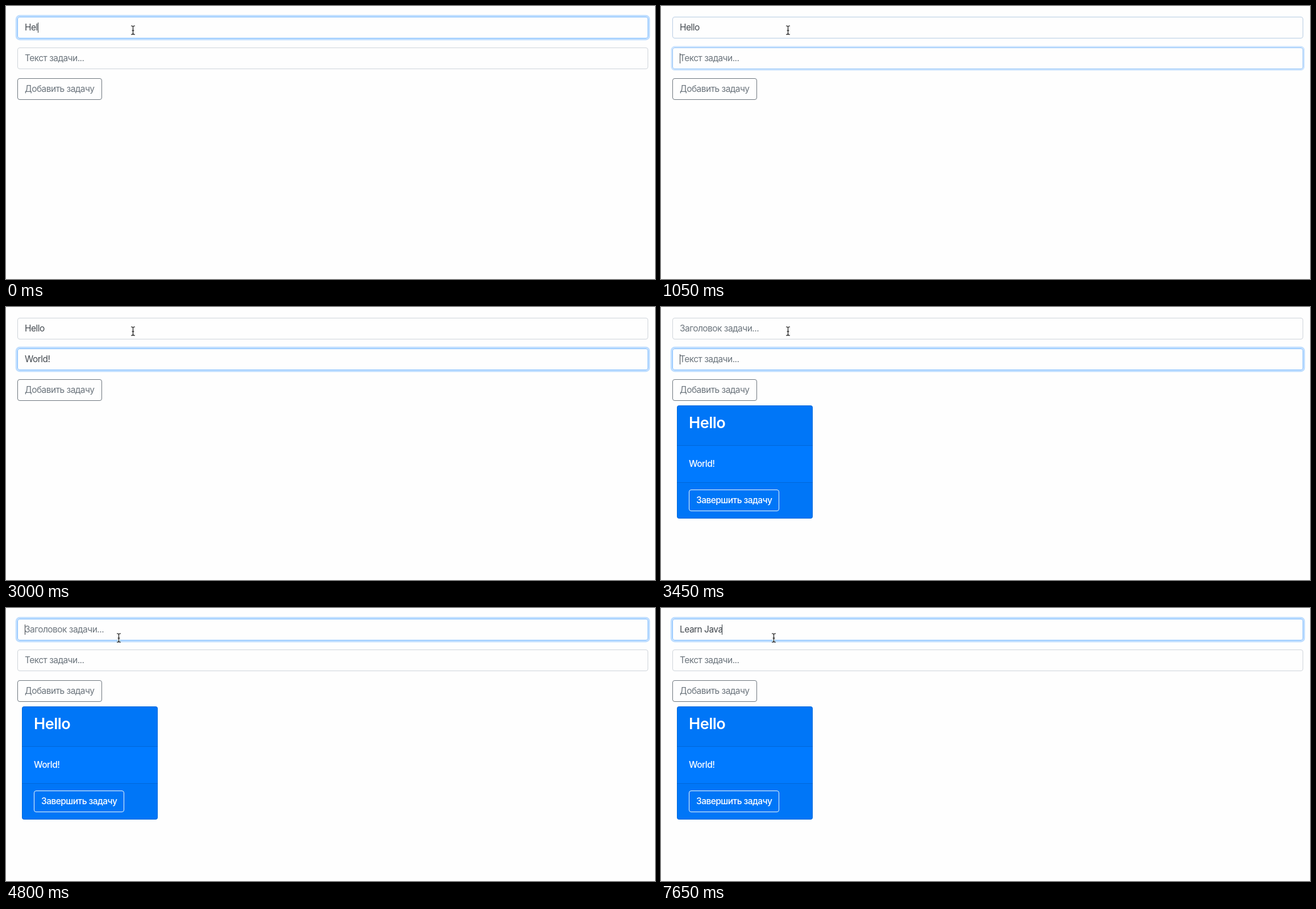
Recreate the animation shown at these times as an HTML page. Size 1142 by 480 pixels, loop 8 s.

```html
<!DOCTYPE html>
<html lang="ru">
<head>
<meta charset="utf-8">
<title>Задачи</title>
<style>
  html, body { margin: 0; width: 100%; height: 100%; overflow: hidden; background: #fefefe; }
  body {
    position: relative;
    font: 15.5px/36px Inter, "Liberation Sans", sans-serif;
    letter-spacing: -.53px;
    white-space: pre;
  }
  div, svg { position: absolute; box-sizing: border-box; }
  .field {
    left: 20px; width: 1110px; height: 38px; padding: 0 12px;
    border: 1px solid #ced4da; border-radius: 4px;
    color: #41474d;
  }
  .field.empty { color: #6c757d; }
  #head { top: 19px; }
  #body { top: 73px; }
  #caret { width: 1px; height: 18px; background: #343a40; }
  .button {
    height: 38px; padding: 0 12px;
    border: 1px solid; border-radius: 4px;
  }
  #add { left: 20px; top: 127px; width: 149px; color: #6c757d; }
  #card {
    left: 28px; top: 173px; width: 239px; height: 199px;
    border-radius: 4px; overflow: hidden;
    background: #007aff; color: #fff; font-weight: 500;
  }
  #card .shade { left: 0; width: 100%; background: rgba(0, 0, 0, .03); }
  #card .top { top: 0; height: 71px; border-bottom: 1px solid rgba(0, 0, 0, .125); }
  #card .foot { top: 135px; height: 64px; border-top: 1px solid rgba(0, 0, 0, .125); }
  #card .edge { inset: 0; border: 1px solid rgba(0, 0, 0, .125); border-radius: 4px; }
  #card .title { left: 21px; top: 13px; font-size: 27.2px; font-weight: 600; letter-spacing: -.6px; }
  #card .text { left: 21px; top: 85px; }
  #done { left: 21px; top: 148px; width: 159px; border-color: #f8f9fa; }
  #mouse { left: 0; top: 0; width: 1142px; height: 480px; }
</style>
</head>
<body>
<div id="head" class="field"></div>
<div id="body" class="field"></div>
<div id="add" class="button">Добавить задачу</div>
<div id="card">
  <div class="shade top"></div>
  <div class="shade foot"></div>
  <div class="edge"></div>
  <div class="title">Hello</div>
  <div class="text">World!</div>
  <div id="done" class="button">Завершить задачу</div>
</div>
<div id="caret"></div>
<svg id="mouse" viewBox="0 0 1142 480" fill="none">
  <g id="beam">
    <path d="M0-7V8" stroke="#fff" stroke-width="3"/>
    <path d="M-3.5-7.5h1.5q2 0 2 2q0-2 2-2h1.5M0-6V6M-3.5 7.5h1.5q2 0 2-2q0 2 2 2h1.5M-2 .5h4" stroke="#000" stroke-width="1.1"/>
  </g>
  <path id="arrow" d="M0 0V16L3.7 12.5L6 18L8.5 17L6.2 11.6H11Z" fill="#000" stroke="#fff"/>
</svg>
<script>
const LOOP = 8000;
const $ = id => document.getElementById(id);
const head = $('head'), body = $('body'), caret = $('caret');

// focus runs from 0 (title field) to 1 (text field); caret is its x, 0 when blinked off
const start = { head: 'Hel', body: '', focus: 0, caret: 56, card: false, mouse: [223.5, 42.5], arrow: false };
const steps = [
  [300, { head: 'Hell', caret: 60 }],
  [450, { head: 'Hello', caret: 68 }],
  [900, { caret: 0 }],
  [1050, { focus: .78, caret: 33 }],
  [1200, { focus: 1 }],
  [1500, { caret: 0 }],
  [1650, { body: 'W', caret: 48 }],
  [1800, { body: 'Wo', caret: 56 }],
  [1950, { body: 'Wor', caret: 61 }],
  [2100, { body: 'Worl', caret: 64 }],
  [2250, { body: 'World', caret: 73 }],
  [2550, { body: 'World!', caret: 78 }],
  [3000, { caret: 0 }],
  [3450, { head: '', body: '', caret: 33, card: true }],
  [3900, { caret: 0 }],
  [4200, { mouse: [223.5, .5], arrow: true }],
  [4350, { mouse: [210.5, 28.5], arrow: false, caret: 33 }],
  [4500, { mouse: [198.5, 52.5] }],
  [4800, { focus: 0, caret: 33 }],
  [5250, { caret: 0 }],
  [5400, { head: 'L', caret: 41 }],
  [5550, { head: 'Le', caret: 49 }],
  [5700, { head: 'Lea', caret: 57 }],
  [6000, { head: 'Lear', caret: 62 }],
  [6150, { head: 'Learn', caret: 71 }],
  [6300, { head: 'Learn ', caret: 75 }],
  [6750, { caret: 0 }],
  [7200, { head: 'Learn J', caret: 83 }],
  [7500, { head: 'Learn Ja', caret: 91 }],
  [7650, { head: 'Learn Java', caret: 107 }]
];

const mix = (a, b, p) => a.map((v, i) => Math.round(v + (b[i] - v) * p));

function setField(el, text, hint, glow) {
  const value = text || hint;
  if (el.textContent !== value) el.textContent = value;
  el.classList.toggle('empty', !text);
  el.style.borderColor = `rgb(${mix([206, 212, 218], [128, 189, 255], glow)})`;
  el.style.boxShadow = `0 0 0 ${3.2 * glow}px rgba(0, 123, 255, ${.25 * glow})`;
}

function draw(now) {
  const t = now % LOOP;
  const s = Object.assign({}, start, ...steps.filter(([at]) => at <= t).map(([, change]) => change));
  setField(head, s.head, 'Заголовок задачи...', 1 - s.focus);
  setField(body, s.body, 'Текст задачи...', s.focus);
  caret.style.display = s.caret ? 'block' : 'none';
  caret.style.left = s.caret + 'px';
  caret.style.top = (s.focus ? 83 : 29) + 'px';
  $('card').style.display = s.card ? 'block' : 'none';
  $('beam').style.display = s.arrow ? 'none' : 'inline';
  $('arrow').style.display = s.arrow ? 'inline' : 'none';
  $(s.arrow ? 'arrow' : 'beam').setAttribute('transform', `translate(${s.mouse})`);
}

function frame() {
  draw(performance.now());
  requestAnimationFrame(frame);
}
frame();
</script>
</body>
</html>
```
